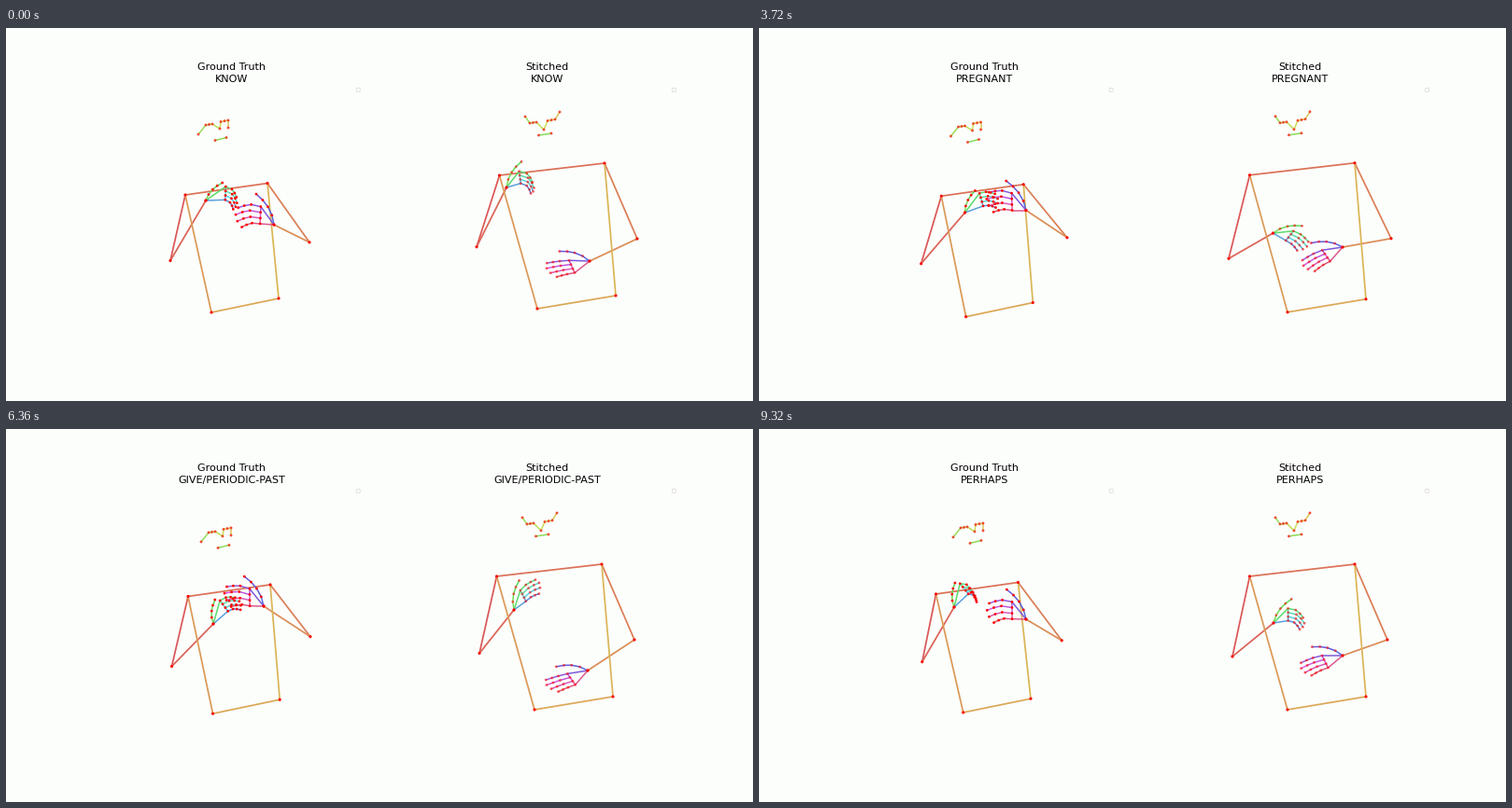
A matplotlib script that plays this animation: 800x400 px, repeating every 9360 ms.

```python
import colorsys

import matplotlib.pyplot as plt
import numpy as np
from matplotlib.animation import FuncAnimation
from matplotlib.collections import LineCollection
from matplotlib.patches import FancyBboxPatch

W, H, DPI = 800, 400, 100
FRAMES, STEP_MS = 234, 40
PX = 72 / DPI

# Arms of each sign: wrist x, y, knuckle angle, finger angle (left, right)
GT_SIGNS = {
    "KNOW": [(214, 185, 35, -45), (287, 211, 126, 183)],
    "PAST": [(183, 168, 113, 54), (290, 215, 133, 194)],
    "FAMILY02": [(216, 193, 50, -25), (275, 186, 128, 180)],
    "PREGNANT": [(225, 203, 56, 20), (297, 205, 132, 176)],
    "GIVE/PERIODIC-PAST": [(222, 209, 74, 11), (276, 190, 129, 175)],
    "PERHAPS": [(209, 191, 76, -40), (286, 204, 129, 184)],
}
ST_SIGNS = {
    "KNOW": [(536, 171, 52, -40), (625, 250, 178, 187)],
    "PAST": [(520, 173, 97, 42), (613, 247, 178, 195)],
    "FAMILY02": [(551, 208, 5, -48), (613, 203, 177, 203)],
    "PREGNANT": [(550, 232, 7, -24), (637, 267, 200, 211)],
    "GIVE/PERIODIC-PAST": [(544, 194, 72, 35), (623, 259, 189, 196)],
    "PERHAPS": [(551, 208, 45, -32), (625, 243, 180, 199)],
}

# Step of the pose, step where its label starts, sign,
# then the offsets of torso and head on the left and of the body on the right
POSES = [
    (0, 0, "KNOW", (0, 0), (-1, -1), (0, 0)),
    (33, 17, "PAST", (1, 2.5), (-4, -1), (-11, 0)),
    (65, 46, "FAMILY02", (6.5, 1.5), (5, -2), (-7, -3)),
    (115, 88, "PREGNANT", (0, 1), (-8, 4), (1, 2.5)),
    (153, 136, "GIVE/PERIODIC-PAST", (3, 0.5), (2, 6), (-3, 0)),
    (201, 182, "FAMILY02", (-2, -2.5), (3, 0), (-6.5, -3)),
    (224, 218, "PERHAPS", (-2.5, -2), (1, 1), (-3, 0)),
]
STEPS = [p[0] for p in POSES]

# x, y, share of the torso offset, share of the wrist height
GT_BODY = dict(shoulders=[(192, 179, 1, 0), (280, 166.5, 1, 0)],
               elbows=[(176, 212.5, 0.5, 0.2), (325, 156, 0.3, 0.35)],
               hips=[(220, 305, 0.5, 0), (292, 290, 0.4, 0)])
ST_BODY = dict(shoulders=[(528.5, 158, 1, 0), (641, 145, 1, 0)],
               elbows=[(504, 192, -1, 0.25), (676, 226, 1, 0)],
               hips=[(569, 301, 1, 0), (653, 287, 1, 0)])

# Nose, then left ear, left eye, right eye, right ear, mouth relative to it
GT_FACE = [(230, 109), (-23, 6), (-15, -4), (9, -9), (9, -1), (-5, 12.5), (7, 9.5)]
ST_FACE = [(576, 109), (-20, -14), (-15, -7), (12, -11), (17, -19), (-5.5, 6), (8, 4)]

# Lengths of palm, finger and thumb, share of the palm at the pinky,
# angle from index to pinky knuckle, angle from thumb to index knuckle
GT_HANDS = [(26, 17, 26, 0.8, -33, -12), (24, 25, 38, 0.62, 50, 6)]
ST_HANDS = [(22, 20, 32, 0.72, -36, -8), (22, 24, 34, 0.92, 40, 16)]

BODY_EDGES = [(0, 1), (1, 2), (0, 3), (3, 4), (4, 5), (0, 6), (6, 7), (3, 7)]
FACE_EDGES = [(i, i + 1) for i in range(8, 16)] + [(17, 18)]
FINGERS = [(i + j, i + j + 1) for i in (5, 9, 13, 17) for j in range(3)]
HAND_EDGES = ([(i, i + 1) for i in range(4)] + [(0, 5)] + FINGERS[:3] + [(5, 9)]
              + FINGERS[3:6] + [(9, 13)] + FINGERS[6:9] + [(13, 17), (0, 17)]
              + FINGERS[9:])
EDGES = np.array(BODY_EDGES + FACE_EDGES
                 + [(a + o, b + o) for o in (19, 40) for a, b in HAND_EDGES])
COLORS = [colorsys.hls_to_rgb(i / len(EDGES), 0.6, 0.65) for i in range(len(EDGES))]


def polar(angle, r):
    a = np.radians(angle)
    return r * np.array([np.cos(a), -np.sin(a)])


def blend(vals, k):
    """Eased value at step k and how far it is away from any pose."""
    i = int(np.clip(np.searchsorted(STEPS, k, "right") - 1, 0, len(STEPS) - 2))
    u = (k - STEPS[i]) / (STEPS[i + 1] - STEPS[i])
    ease = 0.5 - 0.5 * np.cos(np.pi * u)
    return vals[i] + (vals[i + 1] - vals[i]) * ease, np.sin(np.pi * u) ** 2


def face_points(face, offset):
    nose, ear_l, eye_l, eye_r, ear_r, *mouth = np.array(face, float)
    rel = [ear_r, eye_r, eye_r + (-4, 0.7), eye_r + (-8, 1.5), (0, 0),
           eye_l + (7, -1), eye_l + (3.5, -0.5), eye_l, ear_l, *mouth]
    return nose + offset + np.array(rel)


def hand_points(arm, size):
    x, y, palm, finger = arm
    palm_len, finger_len, thumb_len, pinky, fan, lead = size
    wrist = np.array([x, y])
    thumb = palm - lead
    tip = polar(thumb, thumb_len)
    ctrl = polar(thumb - 25 * np.sign(fan), thumb_len * 0.5)
    pts = [wrist]
    for u in (0.28, 0.55, 0.78, 1):
        pts.append(wrist + 2 * u * (1 - u) * ctrl + u * u * tip)
    index = wrist + polar(palm, palm_len)
    last = wrist + polar(palm + fan, palm_len * pinky)
    curl = 0.27 * (palm - finger)
    for j, share in enumerate((1, 1.1, 1.02, 0.82)):
        p = index + (last - index) * j / 3
        pts.append(p)
        for bone, bend in ((0.42, 1), (0.3, -0.4), (0.28, -1)):
            angle = finger + fan * 0.05 * j + curl * bend
            p = p + polar(angle, finger_len * share * bone)
            pts.append(p)
    return np.array(pts)


class Panel:
    def __init__(self, ax, cx, name, body, face, hands, signs, offsets, dot_alpha):
        self.body, self.face, self.hands = body, face, hands
        self.keys = np.array([np.r_[off, np.ravel(signs[pose[2]])]
                              for pose, off in zip(POSES, offsets)], float)
        style = dict(ha="center", va="baseline", fontsize=8,
                     family="DejaVu Sans", color="black")
        ax.text(cx, 45, name, **style)
        self.label = ax.text(cx, 58, "", **style)
        ax.add_patch(FancyBboxPatch((cx + 133.8, 64.4), 4, 4, lw=0.6, fc="none",
                                    ec="#dededc",
                                    boxstyle="round,pad=0,rounding_size=0.8"))
        widths = [1.75 * PX] * 8 + [1.5 * PX] * (len(EDGES) - 8)
        self.lines = LineCollection([], colors=COLORS, linewidths=widths, zorder=2)
        ax.add_collection(self.lines)
        counts = (8, 11, 42)
        size = np.repeat([3.2, 2.9, 2.8], counts) * PX
        rgba = np.repeat([(0.97, 0.06, 0.04, 1), (0.95, 0.2, 0.1, 0.85),
                          (1, 0, 0, dot_alpha)], counts, axis=0)
        self.dots = ax.scatter(np.zeros(61), np.zeros(61), s=size ** 2,
                               c=rgba, linewidths=0, zorder=3)

    def body_points(self, torso, wrists, swing):
        def place(part, side):
            x, y, share, lift = self.body[part][side]
            return np.array([x, y + lift * wrists[side][1]]) + share * torso

        arms = []
        for side, out in enumerate((-4, 4)):
            elbow = place("elbows", side) + (out * swing, 0)
            arms += [place("shoulders", side), elbow, wrists[side]]
        hips = [place("hips", side) + (0, 4 * swing) for side in (0, 1)]
        return np.array(arms + hips)

    def draw(self, k, text):
        state, swing = blend(self.keys, k)
        torso, head, arms = state[:2], state[2:4], state[4:].reshape(2, 4)
        pts = np.vstack([self.body_points(torso, arms[:, :2], swing),
                         face_points(self.face, head)]
                        + [hand_points(a, s) for a, s in zip(arms, self.hands)])
        self.lines.set_segments(pts[EDGES])
        self.dots.set_offsets(pts)
        self.label.set_text(text)
        return [self.lines, self.dots, self.label]


fig = plt.figure(figsize=(W / DPI, H / DPI), dpi=DPI, facecolor="#fcfefc")
ax = fig.add_axes([0, 0, 1, 1])
ax.set_xlim(0, W)
ax.set_ylim(H, 0)
ax.axis("off")

panels = [
    Panel(ax, 241.4, "Ground Truth", GT_BODY, GT_FACE, GT_HANDS, GT_SIGNS,
          [p[3] + p[4] for p in POSES], 0.95),
    Panel(ax, 579.6, "Stitched", ST_BODY, ST_FACE, ST_HANDS, ST_SIGNS,
          [p[5] + p[5] for p in POSES], 0.6),
]


def update(n):
    k = n - max(n - 1, 0) // 24  # every 25th picture repeats the one before
    text = [p[2] for p in POSES if p[1] <= k][-1]
    return [artist for panel in panels for artist in panel.draw(k, text)]


anim = FuncAnimation(fig, update, frames=FRAMES, interval=STEP_MS,
                     init_func=lambda: update(0), repeat=True, repeat_delay=0)
plt.show()
```
